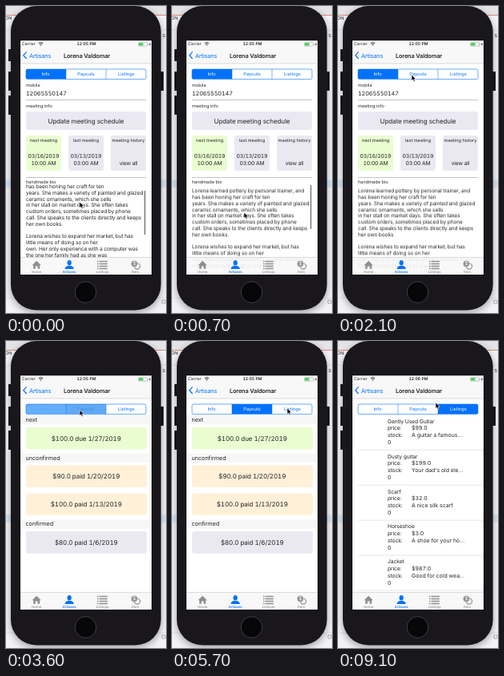
An HTML page for the animation above (9200 ms loop, 200 by 384 pixels).

```html
<!DOCTYPE html>
<html lang="en">
<head>
<meta charset="utf-8">
<title>Artisan app demo</title>
<style>
html, body { margin: 0; width: 100%; height: 100%; overflow: hidden; background: #f3f3f5; }
svg { display: block; width: 100vw; height: 100vh; }
text {
  font-family: Inter, "Open Sans", Roboto, sans-serif;
  font-size: 5.6px;
  font-variant-numeric: tabular-nums;
  dominant-baseline: central;
  text-rendering: geometricPrecision;
  fill: #262628;
  white-space: pre;
}
.mid { text-anchor: middle; }
.nav { font-size: 7.4px; letter-spacing: -.024em; }
.title { font-weight: 600; }
.blue { fill: #0271fa; }
.status { font-size: 5.1px; }
.seg text { font-size: 5.7px; }
.big { font-size: 8px; letter-spacing: -.01em; }
.phone { font-size: 7.3px; letter-spacing: -.015em; }
.date { font-size: 6.8px; letter-spacing: -.02em; }
.bio { font-size: 6.56px; letter-spacing: -.016em; }
.head { font-size: 7.3px; letter-spacing: -.01em; }
.item { font-size: 6.75px; letter-spacing: -.015em; }
.detail { font-size: 6.95px; }
.tab text { font-size: 4.3px; font-weight: 500; fill: #8e8e93; }
.tab .on { fill: #0271fa; }
.body { fill: #19171b; filter: drop-shadow(0 3px 5px rgba(0, 0, 0, .35)); }
.rule { stroke: #a9a9ad; stroke-width: .7; }
.hair { stroke: #cfcfd3; stroke-width: .5; }
.gray { fill: #eae8f1; }
.green { fill: #e9fdd0; }
.orange { fill: #fff0d8; }
.violet { fill: #eae8f1; }

/* every part shares the 9.2 s loop */
.a { animation: 9.2s linear infinite; }
.hard { animation-timing-function: step-end; }

#info { animation-name: info; }
#payouts { animation-name: payouts; }
#listings { animation-name: listings; }
@keyframes info { 0% { opacity: 1 } 39.12%, 100% { opacity: 0 } }
@keyframes payouts { 0% { opacity: 0 } 39.12% { opacity: 1 } 88.03%, 100% { opacity: 0 } }
@keyframes listings { 0% { opacity: 0 } 88.03%, 100% { opacity: 1 } }

#early { animation-name: early; }
#late { animation-name: late; }
@keyframes early { 0% { opacity: 1 } 84.77%, 100% { opacity: 0 } }
@keyframes late { 0% { opacity: 0 } 84.77%, 100% { opacity: 1 } }

#bio { animation-name: scroll; }
@keyframes scroll {
  0% { transform: translateY(-13.3px) }
  7.6% { transform: translateY(0) }
  10.87% { transform: translateY(1.2px) }
  14.1%, 100% { transform: none }
}
#thumb { animation-name: thumb; }
@keyframes thumb {
  0% { transform: translateY(7px); opacity: 1 }
  7.6% { transform: none; opacity: 1 }
  15.2% { transform: none; opacity: 1 }
  18.5%, 100% { transform: none; opacity: 0 }
}

#s1 { animation-name: s1; }
#s2 { animation-name: s2; }
#s3 { animation-name: s3; }
#t1 { animation-name: t1; }
#t2 { animation-name: t2; }
#t3 { animation-name: t3; }
@keyframes s1 {
  0% { fill: #0271fa } 39.12% { fill: #66affc } 40.2% { fill: #b3d7ff } 41.29%, 100% { fill: #fff }
}
@keyframes s2 {
  0% { fill: #fff } 33.69% { fill: #bcd9f6 } 39.12% { fill: #61a9f5 } 40.2% { fill: #308ffa }
  41.29% { fill: #0271fa } 88.03% { fill: #80bdff } 89.12%, 100% { fill: #fff }
}
@keyframes s3 {
  0% { fill: #fff } 84.77% { fill: #bcd9f6 } 88.03% { fill: #509ffa } 89.12%, 100% { fill: #0271fa }
}
@keyframes t1 {
  0% { fill: #fff } 39.12% { fill: #58a3f5 } 40.2% { fill: #3c96fb } 41.29%, 100% { fill: #0271fa }
}
@keyframes t2 {
  0% { fill: #0271fa } 39.12% { fill: #3f8fe4 } 40.2% { fill: #b3d7ff }
  41.29% { fill: #fff } 88.03% { fill: #60a8fa } 89.12%, 100% { fill: #0271fa }
}
@keyframes t3 { 0% { fill: #0271fa } 88.03% { fill: #8fc4ff } 89.12%, 100% { fill: #fff } }

#cursor { animation-name: cursor; }
@keyframes cursor {
  0% { transform: translate(92px, 245px) }
  7.6% { transform: translate(90px, 258px) }
  10.87% { transform: translate(90px, 260px); animation-timing-function: ease-in-out }
  18.4% { transform: translate(92px, 77px) }
  19.57%, 44.57% { transform: translate(92px, 86px) }
  50%, 53.3% { transform: translate(107px, 87px) }
  61.9% { transform: translate(144px, 84px); animation-timing-function: step-end }
  94.55% { transform: translate(142px, 85px); animation-timing-function: step-end }
  98.9%, 100% { transform: translate(122px, 77px) }
}
</style>
</head>
<body>
<svg viewBox="0 0 200 384" preserveAspectRatio="none">
  <defs>
    <clipPath id="bioClip"><rect x="18" y="222" width="164" height="106"/></clipPath>
    <clipPath id="segClip"><rect x="25" y="79" width="150" height="12.6" rx="2"/></clipPath>
  </defs>

  <!-- window behind the phone -->
  <rect width="200" height="384" fill="#f3f3f5"/>
  <rect width="200" height="11" fill="#e4e4e6"/>
  <rect y="11" width="200" height="1" fill="#d98a7d"/>
  <rect y="217" width="200" height="10" fill="#d6e6f4"/>
  <path d="M0 30H200M0 365H200" class="hair"/>
  <text x="-1" y="15.5">ON</text>
  <text x="195.5" y="38">S</text>
  <path d="M195 368h4v4h-4z" fill="none" stroke="#777" stroke-width=".6"/>

  <!-- phone body -->
  <path d="M3 54h4v15h-4zM3 82h4v24h-4zM3 112h4v24h-4zM193 82h4v24h-4z" fill="#19171b"/>
  <rect class="body" x="6" y="0" width="187.7" height="380.5" rx="32"/>
  <circle cx="99.5" cy="358" r="13.3" fill="#070708" stroke="#4c4b50" stroke-width=".8"/>
  <rect x="17.3" y="42.8" width="165.4" height="293.9" fill="#070708"/>
  <rect x="18" y="43.5" width="164" height="292.5" fill="#fff"/>

  <!-- status and navigation bars -->
  <rect x="18" y="43.5" width="164" height="28.5" fill="#f8f8f8"/>
  <path d="M18 72H182" stroke="#b4b4b8" stroke-width=".5"/>
  <text class="status" x="20" y="47.7">Carrier</text>
  <g fill="none" stroke="#111" stroke-width=".8">
    <path d="M40.8 46.6q2.7-2.2 5.4 0M41.8 48q1.7-1.3 3.4 0"/>
    <path d="M43 49.3h1"/>
  </g>
  <g class="mid title">
    <text class="status a hard" id="early" x="100.5" y="47.7">12:05 PM</text>
    <text class="status a hard" id="late" x="100.5" y="47.7">12:06 PM</text>
  </g>
  <rect x="165.5" y="45.6" width="11.2" height="4.6" rx="1" fill="none" stroke="#999" stroke-width=".5"/>
  <rect x="166.1" y="46.2" width="5.4" height="3.4" rx=".5" fill="#3fd158"/>
  <rect x="177.2" y="47.2" width=".7" height="1.5" fill="#999"/>
  <path d="M180.4 45.6L178.9 48.2H179.9L179.4 50.3L181.1 47.5H180Z" fill="#111"/>
  <path d="M25.6 57.4L21.8 61.7L25.6 66" fill="none" stroke="#0271fa" stroke-width="1.2"/>
  <text class="nav blue" x="29" y="62">Artisans</text>
  <text class="nav title mid" x="101" y="62">Lorena Valdomar</text>

  <g class="a hard" id="info">
    <text x="25" y="100">mobile</text>
    <text class="phone" x="25" y="109">12065550147</text>
    <path class="rule" d="M25 117.5H175"/>
    <text x="25" y="126">meeting info</text>
    <rect class="gray" x="25" y="132" width="150" height="23" rx="3"/>
    <text class="big mid" x="100" y="143.7">Update meeting schedule</text>
    <g id="meetings"></g>
    <path class="rule" d="M25 214.5H175"/>
    <text x="25" y="221">handmade bio</text>
    <g clip-path="url(#bioClip)"><g class="a" id="bio"></g></g>
    <rect class="a" id="thumb" x="173" y="224" width="1.2" height="55" rx=".6" fill="#666"/>
  </g>
  <g class="a hard" id="payouts"></g>
  <g class="a hard" id="listings"></g>

  <!-- segmented control -->
  <g class="seg mid">
    <g clip-path="url(#segClip)">
      <rect class="a hard" id="s1" x="25" y="79" width="50" height="12.6"/>
      <rect class="a hard" id="s2" x="75" y="79" width="50" height="12.6"/>
      <rect class="a hard" id="s3" x="125" y="79" width="50" height="12.6"/>
    </g>
    <rect x="25" y="79" width="150" height="12.6" rx="2" fill="none" stroke="#0271fa" stroke-width=".6"/>
    <path d="M75 79v12.6M125 79v12.6" stroke="#0271fa" stroke-width=".5"/>
    <text class="a hard" id="t1" x="49.5" y="85.3">Info</text>
    <text class="a hard" id="t2" x="100" y="85.3">Payouts</text>
    <text class="a hard" id="t3" x="150.3" y="85.3">Listings</text>
  </g>

  <!-- tab bar, slightly see-through -->
  <g class="tab mid">
    <rect x="18" y="314.4" width="164" height="21.6" fill="#f8f8f8" fill-opacity=".92"/>
    <path d="M18 314.4H182" stroke="#b4b4b8" stroke-width=".5"/>
    <path d="M32.6 324.2L38.2 318.8L43.8 324.2H42.2V328.8H39.6V325.5H36.8V328.8H34.2V324.2Z" fill="#8e8e93"/>
    <g class="on">
      <ellipse cx="79.2" cy="321.3" rx="2.6" ry="3.2"/>
      <path d="M73.6 329q.2-3.2 3.8-4h3.6q3.6.8 3.8 4z"/>
    </g>
    <path d="M114 319.5h1.6m1 0h10.2M114 322.5h1.6m1 0h10.2M114 325.5h1.6m1 0h10.2M114 328.5h1.6m1 0h10.2" stroke="#8e8e93" stroke-width="1.3"/>
    <circle cx="164" cy="325.6" r="3.6" fill="none" stroke="#8e8e93" stroke-width="1.2"/>
    <circle cx="160.4" cy="322.4" r="4" fill="#8e8e93" stroke="#f8f8f8" stroke-width=".4"/>
    <text x="160.4" y="322.4" style="font-size:6px;fill:#f8f8f8">$</text>
    <text x="38.2" y="333">Home</text>
    <text class="on" x="79.2" y="333">Artisans</text>
    <text x="120.6" y="333">Listings</text>
    <text x="161.6" y="333">Item</text>
  </g>

  <path class="a" id="cursor" d="M0 0V7.4L1.7 5.9L2.9 8.5L4.2 7.9L3.1 5.4H5.3Z" stroke="#fff" stroke-width=".6"/>
</svg>

<script>
const fill = (id, html) => { document.getElementById(id).innerHTML = html; };
const text = (cls, x, y, str) => `<text class="${cls}" x="${x}" y="${y}">${str}</text>`;
const card = (cls, x, y, w, h) =>
  `<rect class="${cls}" x="${x}" y="${y}" width="${w}" height="${h}" rx="3"/>`;

const meetings = [
  ["green", 25, "next meeting", "03/16/2019", "10:00 AM"],
  ["gray", 78, "last meeting", "03/13/2019", "03:00 AM"],
  ["gray", 131, "meeting history", "", "view all"],
];
fill("meetings", meetings.map(([cls, x, label, day, time]) =>
  card(cls, x, 162, 44, 44) +
  text("mid", x + 22, 168.6, label) +
  text("date mid", x + 22, 187.3, day) +
  text("date mid", x + 22, 196.3, time)).join(""));

const bio = `Lorena learned pottery by personal trainer, and
has been honing her craft for ten
years. She makes a variety of painted and glazed
ceramic ornaments, which she sells
in her stall on market days. She often takes
custom orders, sometimes placed by phone
call. She speaks to the clients directly and keeps
her own books.

Lorena wishes to expand her market, but has
little means of doing so on her
own. Her only experience with a computer was
the one her family had as she was`;
fill("bio", bio.split("\n").map((line, i) => text("bio", 25, 231.4 + i * 7.8, line)).join(""));

const header = (y, str) =>
  `<rect x="18" y="${y - 5.5}" width="164" height="11.4" fill="#f7f7f7"/>` + text("head", 24.5, y, str);
const payout = (cls, y, str) => card(cls, 25, y, 151, 27.7) + text("big mid", 100.3, y + 14, str);
fill("payouts",
  header(98.5, "next") +
  payout("green", 107.8, "$100.0 due 1/27/2019") +
  header(146, "unconfirmed") +
  payout("orange", 155.3, "$90.0 paid 1/20/2019") +
  payout("orange", 190.4, "$100.0 paid 1/13/2019") +
  header(228.8, "confirmed") +
  payout("violet", 238, "$80.0 paid 1/6/2019"));

const goods = [
  ["Gently Used Guitar", "$99.0", "A guitar a famous…"],
  ["Dusty guitar", "$199.0", "Your dad's old ele…"],
  ["Scarf", "$32.0", "A nice silk scarf"],
  ["Horseshoe", "$3.0", "A shoe for your ho…"],
  ["Jacket", "$987.0", "Good for cold wea…"],
];
fill("listings", goods.map(([name, price, about], i) => {
  const y = 100.2 + i * 43.9;
  return text("item", 62, y, name) +
    text("item", 62, y + 8.6, "price:") + text("detail", 92, y + 8.6, price) +
    text("item", 62, y + 17.3, "stock:") + text("detail", 92, y + 17.3, about) +
    text("item", 62, y + 26.4, "0") +
    `<path class="hair" d="M24.5 ${y + 36.2}H182"/>`;
}).join(""));
</script>
</body>
</html>
```
